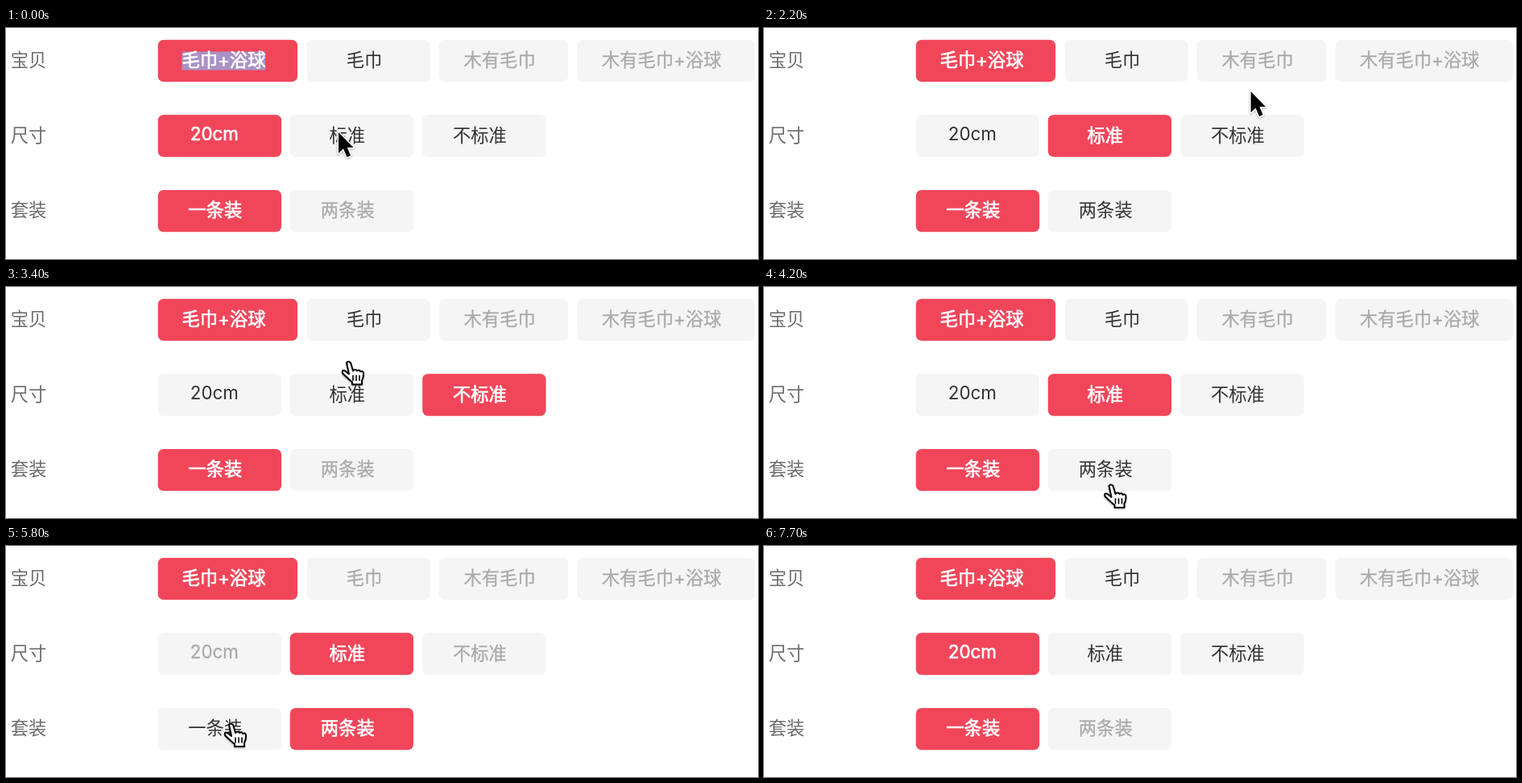
An HTML page that plays this animation: 934x288 px, repeating every 8000 ms.

```html
<!DOCTYPE html>
<html lang="zh-CN">
<head>
<meta charset="utf-8">
<style>
html, body { margin: 0; width: 100%; height: 100%; overflow: hidden; background: #fff; }
svg { display: block; width: 934px; height: 288px; }
text { font: 22.3px Inter, "Noto Sans CJK SC", "Noto Sans CJK", sans-serif; fill: #333; white-space: pre; }
.label { fill: #6c6c6c; }
.option rect { fill: #f5f5f5; }
.off text { fill: #aaa; stroke: #aaa; stroke-width: .3; }
.on rect { fill: #f1465a; }
.on text { fill: #fff; stroke: #fff; stroke-width: .7; }
#cursor > g { display: none; stroke-linejoin: round; stroke-linecap: round; filter: drop-shadow(0 1px 1px #0005); }
</style>
</head>
<body>
<svg viewBox="0 0 934 288">
  <g id="rows"></g>
  <rect id="mark" x="218.5" y="29.5" width="103.5" height="23" fill="#ab92c6"/>
  <g id="front"></g>
  <g id="cursor">
    <g id="arrow">
      <path d="M0 0V26L6 20.5 10.5 31 15 29 10.8 19H18.5Z" stroke="#fff" stroke-width="3" paint-order="stroke"/>
    </g>
    <g id="hand" fill="#fff" stroke="#000" stroke-width="2">
      <path d="M-3 1Q-1-2 2 1L5 11Q8 8 10 11 13 9 14 12 18 10 18 15 18 20 16 23V28H4V25Q-1 21-8 14-9 9-5 11L0 15Z"/>
      <path d="M5 17V23M9 17V23M13 17V23" stroke-width="1.6"/>
    </g>
    <g id="beam" fill="none" stroke="#000" stroke-width="2">
      <path id="bar" d="M-6-14Q0-14 0-9V9Q0 14-6 14M6-14Q0-14 0-9V9Q0 14 6 14M-3 0H3"/>
    </g>
  </g>
</svg>
<script>
const LOOP = 8000, STEP = 100;
const $ = id => document.getElementById(id);

function add(parent, tag, attrs, text = '') {
  const el = document.createElementNS('http://www.w3.org/2000/svg', tag);
  for (const key in attrs) el.setAttribute(key, attrs[key]);
  el.textContent = text;
  return parent.appendChild(el);
}

// White rim behind the text pointer
const rim = $('bar').cloneNode();
rim.removeAttribute('id');
rim.setAttribute('style', 'stroke: #fff; stroke-width: 4.5');
$('beam').prepend(rim);

// Option: text, box left, box width, text left, baseline lift
const rows = [
  ['宝贝', ['毛巾+浴球', 189, 173, 218.5], ['毛巾', 374, 152.5, 422.8], ['木有毛巾', 538, 160, 568.5], ['木有毛巾+浴球', 710, 220.5, 740]],
  ['尺寸', ['20cm', 189, 153, 228.8, 1.3], ['标准', 353, 153, 401.5], ['不标准', 517.5, 153, 555]],
  ['套装', ['一条装', 189, 153, 226.3], ['两条装', 353, 153, 390.8]]
];

const options = rows.map(([label, ...list], r) => {
  const top = 14.7 + r * 93.6, base = top + 33.4;
  add($('rows'), 'text', { x: 5.8, y: base, class: 'label' }, label);
  return list.map(([text, x, width, left, lift = 0]) => {
    const parts = [$('rows'), $('front')].map(layer => add(layer, 'g', {}));
    add(parts[0], 'rect', { x: x - .3, y: top, width: width + .4, height: 52.4, rx: 7 });
    add(parts[1], 'text', { x: left, y: base - lift }, text);
    return parts;
  });
});

// Clicks: time, row, chosen option
const clicks = [[800, 1, 1], [2500, 1, 2], [3600, 1, 1], [4300, 2, 1], [6000, 2, 0], [7100, 1, 0]];

// Pointer: time, x, y, shape held until the next key
const path = [
  [0, 413, 130, 'arrow'], [800, 413, 130, 'hand'], [1000, 576, 141, 'hand'], [1300, 576, 141, 'hand'],
  [1400, 577, 162, 'arrow'], [1500, 574.5, 172, 'arrow'], [1600, 690, 100, 'arrow'], [1700, 826, 47, 'beam'],
  [1800, 700, 50, 'arrow'], [1900, 612, 50, 'arrow'], [2100, 612, 50, 'arrow'], [2400, 590, 138, 'hand'],
  [2600, 590, 138, 'hand'], [2700, 560, 172, 'arrow'], [2800, 495, 158, 'hand'], [2900, 452, 142, 'hand'],
  [3000, 428, 124, 'hand'], [3200, 428, 52, 'hand'], [3300, 428, 52, 'hand'], [3500, 424, 135, 'hand'],
  [3700, 424, 135, 'hand'], [3900, 428, 185, 'arrow'], [4000, 430, 215, 'hand'], [4200, 431.5, 247, 'hand'],
  [4400, 431.5, 247, 'hand'], [4600, 420, 180, 'arrow'], [4800, 440, 51, 'beam'], [4900, 400, 75, 'arrow'],
  [5100, 272, 133, 'beam'], [5200, 272, 133, 'beam'], [5300, 310, 85, 'arrow'], [5450, 405, 52, 'arrow'],
  [5600, 330, 130, 'arrow'], [5700, 285, 215, 'hand'], [5800, 280, 222, 'hand'], [6100, 280, 222, 'hand'],
  [6300, 277, 190, 'arrow'], [6500, 275, 168, 'arrow'], [6600, 370, 130, 'hand'], [6750, 428, 50, 'hand'],
  [6900, 330, 105, 'arrow'], [7000, 275, 135, 'hand'], [7200, 275, 135, 'hand'], [7400, 272, 190, 'arrow'],
  [7500, 272, 238, 'none'], [LOOP, 272, 238, 'none']
];

function draw(t) {
  const chosen = [0, 0, 0];
  for (const [time, row, pick] of clicks) if (t >= time) chosen[row] = pick;
  const [, size, pack] = chosen;
  const isOff = [
    i => i > 1 || (i === 1 && pack === 1),
    i => i !== 1 && pack === 1,
    i => i === 1 && size !== 1
  ];
  options.forEach((list, r) => list.forEach((parts, i) => {
    const state = chosen[r] === i ? 'on' : isOff[r](i) ? 'off' : '';
    for (const part of parts) part.setAttribute('class', 'option ' + state);
  }));
  $('mark').style.display = t < 800 ? '' : 'none';

  const k = path.findIndex(key => key[0] > t);
  const [t0, x0, y0, shape] = path[k - 1], [t1, x1, y1] = path[k];
  const p = (t - t0) / (t1 - t0);
  $('cursor').setAttribute('transform', `translate(${x0 + (x1 - x0) * p} ${y0 + (y1 - y0) * p})`);
  for (const id of ['arrow', 'hand', 'beam']) $(id).style.display = id === shape ? 'inline' : 'none';
}

const start = performance.now();
function tick() {
  const t = (performance.now() - start) % LOOP;
  draw(Math.floor(t / STEP) * STEP);
  requestAnimationFrame(tick);
}
tick();
</script>
</body>
</html>
```
